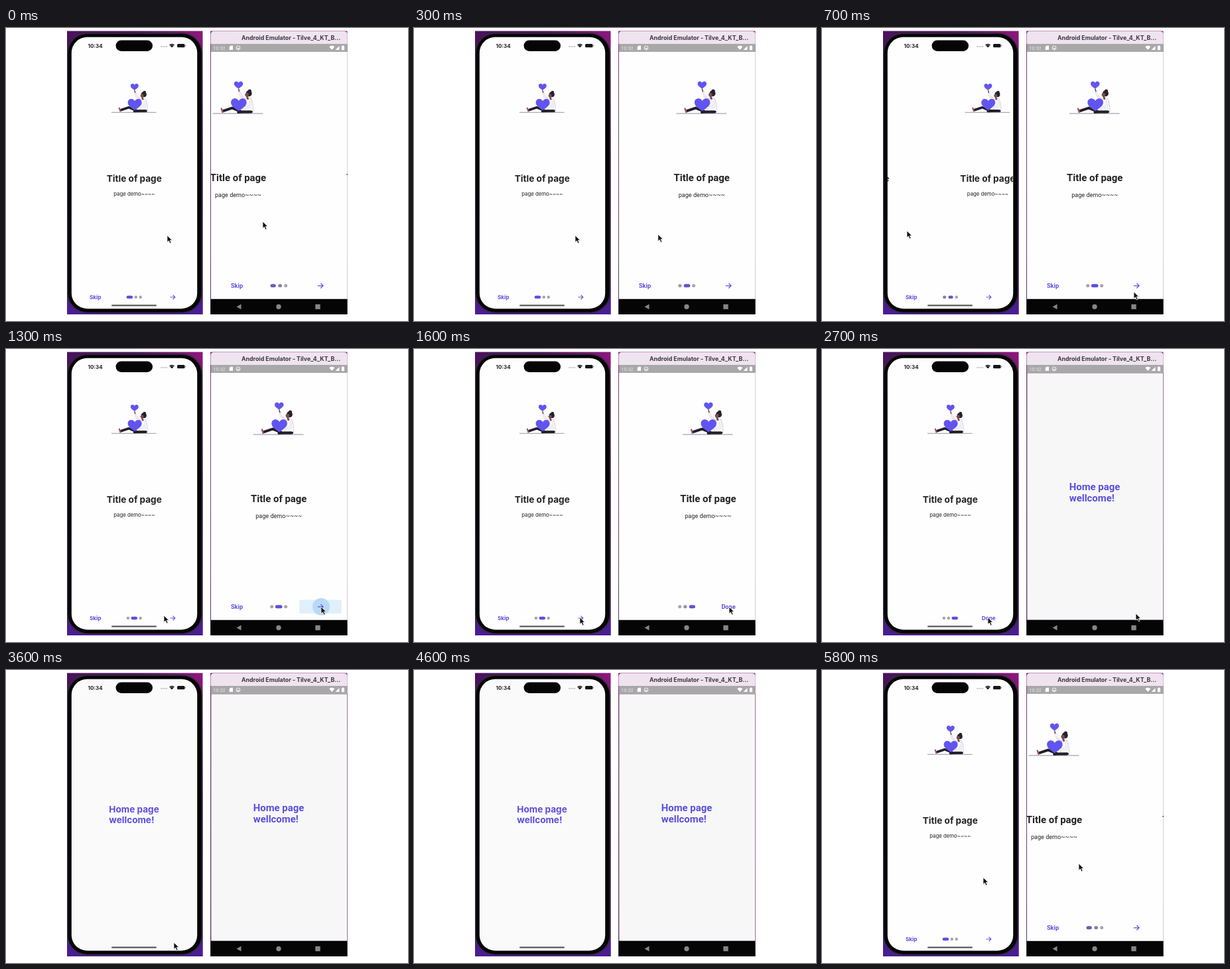
An HTML page that plays this animation: 606 by 442 pixels, repeating every 5900 ms.

```html
<!DOCTYPE html>
<html lang="en">
<head>
<meta charset="utf-8">
<title>Onboarding on two phones</title>
<style>
  html, body { margin: 0; width: 100%; height: 100%; overflow: hidden; background: #fff; }
  svg { display: block; width: 100vw; height: 100vh; }
  .ios { font-family: Inter, Arial, sans-serif; }
  .droid { font-family: Roboto, Arial, sans-serif; }
  .bold { font-weight: 700; }
  .accent { fill: #5b4fde; }
  .ink { fill: #222; }
</style>
</head>
<body>
<svg id="stage" viewBox="0 0 606 442" xmlns="http://www.w3.org/2000/svg">
  <defs>
    <linearGradient id="wallTop" x1="0" x2="1">
      <stop offset="0" stop-color="#4a145c"/><stop offset=".5" stop-color="#4d1362"/><stop offset="1" stop-color="#8e187c"/>
    </linearGradient>
    <linearGradient id="wallFade" x1="0" y1="0" x2="0" y2="1">
      <stop offset="0" stop-color="#35135e" stop-opacity="0"/><stop offset=".45" stop-color="#35135e"/><stop offset="1" stop-color="#4a1d92"/>
    </linearGradient>
    <linearGradient id="edge" x1="0" y1="0" x2="0" y2="1">
      <stop offset="0" stop-color="#8a3078"/><stop offset=".3" stop-color="#6a4a70"/><stop offset="1" stop-color="#54385f"/>
    </linearGradient>
    <clipPath id="iosClip"><rect x="98.800" y="13.800" width="189.400" height="409.600" rx="23.500"/></clipPath>
    <clipPath id="droidClip"><rect x="309" y="36" width="205.800" height="373"/></clipPath>
    <path id="heart" d="M0 .95C-.5 .55-1 .2-1-.3C-1-1-.25-1.1 0-.55C.25-1.1 1-1 1-.3C1 .2 .5 .55 0 .95Z" fill="#6254f0"/>
    <g id="art" fill="none" stroke-linecap="round" stroke-linejoin="round">
      <path d="M-34 0H33" stroke="#8f8b9f" stroke-width=".9"/>
      <path d="M9-20L17-21Q21-13 20-3H9Z" fill="#f7f7fa" stroke="#c4c2cf" stroke-width=".6"/>
      <path d="M10-18L3.500-24L1.500-30" stroke="#c4c2cf" stroke-width="2.600"/>
      <path d="M10-18L3.500-24L1.500-30" stroke="#f7f7fa" stroke-width="1.600"/>
      <path d="M1.400-30L.6-33" stroke="#7d4a4b" stroke-width="1.500"/>
      <use href="#heart" transform="translate(.5 -38.500) scale(6 5.200)"/>
      <path d="M17-2.300L4-2.500L-8-7.500L-20-3.500" stroke="#211f2b" stroke-width="3.600"/>
      <path d="M-22.500-6.500L-21-2" stroke="#9d5469" stroke-width="2.200"/>
      <use href="#heart" transform="translate(.8 -12) scale(10.500 9.200)"/>
      <path d="M18-2.200L6-2L0-1.600" stroke="#211f2b" stroke-width="3.200"/>
      <path d="M17-18L16-9L9-8" stroke="#d5d3de" stroke-width="2.800"/>
      <path d="M17-18L16-9L9-8" stroke="#f7f7fa" stroke-width="1.800"/>
      <path d="M12-23L13-20" stroke="#7d4a4b" stroke-width="2.600"/>
      <circle cx="14.500" cy="-27" r="4" fill="#25222f"/>
      <circle cx="15.500" cy="-30.300" r="2.300" fill="#25222f"/>
      <circle cx="11.800" cy="-25.300" r="2.500" fill="#7d4a4b"/>
    </g>
    <path id="pointer" d="M0 0V10.200L2.400 8L4.200 12.100L6.100 11.300L4.300 7.300H7.500Z" fill="#111" stroke="#fff" stroke-width=".7"/>
    <path id="arrow" d="M-3.700 0H3.500M.3-3.300L3.600 0L.3 3.300" fill="none" stroke="#5b4fde" stroke-width="1.100"/>
  </defs>

  <rect x="92" y="4.500" width="204.500" height="427.500" fill="url(#wallTop)"/>
  <rect x="92" y="4.500" width="204.500" height="427.500" fill="url(#wallFade)"/>
  <rect x="92.900" y="8.200" width="202.400" height="421.200" rx="30" fill="#050506" stroke="#2c2932" stroke-width="1.400"/>
  <g id="ios" class="ios"></g>
  <g class="ios">
    <rect x="165.500" y="18.500" width="55.500" height="16.500" rx="8.200" fill="#050505"/>
    <text x="123.500" y="29.700" font-size="8" class="bold ink">10:34</text>
    <path d="M233.500 28H243" stroke="#999" stroke-width="1.300" stroke-dasharray="1.300 1.400"/>
    <path d="M246 25.500Q250 21.800 254 25.500L250 29.600Z" fill="#111"/>
    <path d="M247 26.600Q250 24.200 253 26.600" fill="none" stroke="#fff" stroke-width=".5"/>
    <rect x="258" y="24" width="11.500" height="5.200" rx="1.500" fill="#151515"/>
    <path d="M270.700 25.600V27.600" stroke="#888"/>
    <rect x="159" y="417.600" width="68" height="2" rx="1" fill="#4a4a4c"/>
  </g>

  <rect x="308" y="4.500" width="206.500" height="427.500" fill="url(#edge)"/>
  <path d="M308.500 24V10Q308.500 5 313.500 5H509.500Q514.500 5 514.500 10V24Z" fill="#eee3ef"/>
  <text x="355" y="17.500" font-size="8.800" class="ios bold" fill="#3b373d">Android Emulator - Tilve_4_KT_B...</text>
  <rect x="309" y="24" width="205.500" height="12" fill="#a8a8a8"/>
  <g id="droid" class="droid"></g>
  <g class="droid" fill="#fff">
    <text x="312.500" y="32.600" font-size="7.300" fill="#e8e8e8">10:32</text>
    <path d="M338.500 26.800H342V33H336.700V28.600Z"/>
    <circle cx="350" cy="30" r="2.900" fill="none" stroke="#fff" stroke-width=".9"/>
    <path d="M348.800 30H351.300V31.600H348.800Z"/>
    <path d="M487.300 28.200Q491.300 25.300 495.300 28.200L491.300 33ZM496.600 33L502.500 27V33ZM505.800 27.300H507V26.500H508.800V27.300H510V33.200H505.800Z"/>
  </g>
  <rect x="308.500" y="408.800" width="206" height="23.200" fill="#050505"/>
  <g fill="#858585"><path d="M347.500 420.500L354.500 416.500V424.500Z"/><circle cx="411" cy="420.500" r="3.700"/><rect x="466.300" y="416.800" width="7.400" height="7.400"/></g>

  <use id="iosPointer" href="#pointer"/>
  <use id="droidPointer" href="#pointer"/>
</svg>
<script>
const LOOP = 5900, STEP = 100;
const LEAD = 700; // the demo has already run this long when the loop begins
const $ = id => document.getElementById(id);
const GREY = [166, 166, 170], ACCENT = [91, 79, 222];

// A move is { start, dur, ...amounts }; swipes add to the page position,
// moves shift the pointer away from its starting point.
const phones = [
  {
    id: 'ios', cx: 193.3, pageWidth: 190, scale: 1,
    screen: { x: 98, y: 13, width: 191, height: 411 },
    artY: 127.3, titleY: 231.8, titleSize: 13.6, bodyY: 253.2, bodySize: 7.8,
    home: { x: 155.3, y: 215.3, lead: 15.6, fill: '#fafafa' },
    barY: 406, skipX: 134.7, nextX: 251.2, button: { width: 59, height: 15.5 },
    swipes: [{ start: 1100, dur: 470, by: 1 }, { start: 2600, dur: 395, by: 1 }],
    presses: [[2600, 3000], [3600, 3800]], homeAt: 3800, leaveAt: 4500,
    pointer: { x: 243, y: 313 },
    moves: [
      { start: 1100, dur: 300, x: -115, y: -7 },
      { start: 1600, dur: 400, x: 110, y: 96 },
      { start: 2000, dur: 200, x: 12, y: 3 },
      { start: 4000, dur: 300, x: 3, y: 6 }
    ]
  },
  {
    id: 'droid', cx: 411.2, pageWidth: 205.5, scale: 1.12,
    screen: { x: 309, y: 36, width: 205.6, height: 373 },
    artY: 129, titleY: 231.2, titleSize: 14.9, bodyY: 255, bodySize: 9.1,
    home: { x: 372.7, y: 213.2, lead: 17.2, fill: '#f7f7f7' },
    barY: 388.8, skipX: 348, nextX: 474, button: { width: 63.5, height: 20.5 }, ripple: true,
    swipes: [{ start: 400, dur: 200, by: .298 }, { start: 700, dur: 400, by: .702 }, { start: 2000, dur: 400, by: 1 }],
    presses: [[1900, 2300], [3000, 3200]], homeAt: 3200, leaveAt: 3900,
    pointer: { x: 449, y: 292 },
    moves: [
      { start: 400, dur: 200, x: -62, y: 0 },
      { start: 700, dur: 150, x: -42, y: 0 },
      { start: 850, dur: 550, x: 125, y: 106 },
      { start: 1400, dur: 300, x: 5, y: -9 },
      { start: 3200, dur: 200, x: -2, y: 10 }
    ]
  }
];

const clamp = u => Math.min(1, Math.max(0, u));
const smooth = u => u * u * (3 - 2 * u);
const travel = (moves, key, t) =>
  moves.reduce((sum, m) => sum + m[key] * smooth(clamp((t - m.start) / m.dur)), 0);

const set = (el, attrs) => { for (const name in attrs) el.setAttribute(name, attrs[name]); };
const show = (el, on) => set(el, { display: on ? 'inline' : 'none' });
const rect = (box, extra) =>
  `<rect x="${box.x}" y="${box.y}" width="${box.width}" height="${box.height}" ${extra}/>`;
const text = (x, y, size, cls, content, anchor = 'middle') =>
  `<text x="${x}" y="${y}" font-size="${size}" class="${cls}" text-anchor="${anchor}">${content}</text>`;

function build(p) {
  const { home, scale, button } = p;
  const page = i => `<g transform="translate(${p.cx + i * p.pageWidth} 0)">
    <use href="#art" transform="translate(0 ${p.artY}) scale(${scale})"/>
    ${text(0, p.titleY, p.titleSize, 'bold ink', 'Title of page')}
    ${text(0, p.bodyY, p.bodySize, 'ink', 'page demo~~~~')}</g>`;
  const label = (x, word) => text(x, p.barY + 3 * scale, 8.2 * scale, 'bold accent', word);
  const greeting = (word, i) =>
    text(home.x, home.y + i * home.lead, p.titleSize, 'bold accent', word, 'start');
  const buttonBox = { ...button, x: p.nextX - button.width / 2, y: p.barY - button.height / 2 };

  $(p.id).innerHTML = `<g clip-path="url(#${p.id}Clip)">
    <g data-part="intro">
      ${rect(p.screen, 'fill="#fefefe"')}
      <g data-part="strip">${[0, 1, 2].map(page).join('')}</g>
      <g data-part="skip">${label(p.skipX, 'Skip')}</g>
      <g data-part="press">${rect(buttonBox, 'rx="2" fill="#e0effc"')}
        <circle data-part="ripple" cx="${p.nextX + 1}" cy="${p.barY}" fill="#b9daf6"/></g>
      <g data-part="next"><use href="#arrow" transform="translate(${p.nextX} ${p.barY}) scale(${scale})"/></g>
      <g data-part="done">${label(p.nextX, 'Done')}</g>
      ${'<rect data-part="dot"/>'.repeat(3)}
    </g>
    <g data-part="home">${rect(p.screen, `fill="${home.fill}" stroke="#6a4a70" stroke-width=".8"`)}
      ${['Home page', 'wellcome!'].map(greeting).join('')}</g>
  </g>`;

  p.part = {};
  $(p.id).querySelectorAll('[data-part]').forEach(el => { p.part[el.dataset.part] = el; });
  p.dots = [...$(p.id).querySelectorAll('[data-part=dot]')];
}

// The active dot stretches; colours pass through a duller, darker mix.
function drawDots(p, pos) {
  const size = 4.5 * p.scale, grow = 5 * p.scale, gap = 2.4 * p.scale;
  let x = p.cx - (size * 3 + grow + gap * 2) / 2;
  p.dots.forEach((el, i) => {
    const k = clamp(1 - Math.abs(pos - i));
    const slot = size + grow * k, width = size + grow * k ** 1.6;
    const dim = 100 * k * (1 - k);
    const color = GREY.map((g, c) => Math.round(g + (ACCENT[c] - g) * k - dim * (c + 1) / 3));
    set(el, {
      x: x + (slot - width) / 2, y: p.barY - size / 2,
      width, height: size, rx: size / 2, fill: `rgb(${color})`
    });
    x += slot + gap;
  });
}

function draw(p, t) {
  const { part } = p;
  const pos = travel(p.swipes, 'by', t), last = pos >= 1.5;
  const press = p.presses.find(([from, to]) => t >= from && t < to);
  show(part.home, t >= p.homeAt);
  show(part.intro, t < p.homeAt);
  set(part.strip, { transform: `translate(${-pos * p.pageWidth} 0)` });
  show(part.skip, !last);
  show(part.next, !last);
  show(part.done, last);
  show(part.press, press);
  set(part.ripple, { r: press && p.ripple ? Math.min(20, 7 + (t - press[0]) * .06) : 0 });
  drawDots(p, pos);

  const x = p.pointer.x + travel(p.moves, 'x', t);
  const y = p.pointer.y + travel(p.moves, 'y', t);
  const pointer = $(p.id + 'Pointer');
  show(pointer, t < p.leaveAt);
  set(pointer, { transform: `translate(${x} ${y})` });
}

function render(ms) {
  const t = Math.floor(((ms + LEAD) % LOOP) / STEP) * STEP;
  phones.forEach(p => draw(p, t));
}

phones.forEach(build);
render(0);
const start = performance.now();
requestAnimationFrame(function tick() {
  render(performance.now() - start);
  requestAnimationFrame(tick);
});
</script>
</body>
</html>
```
